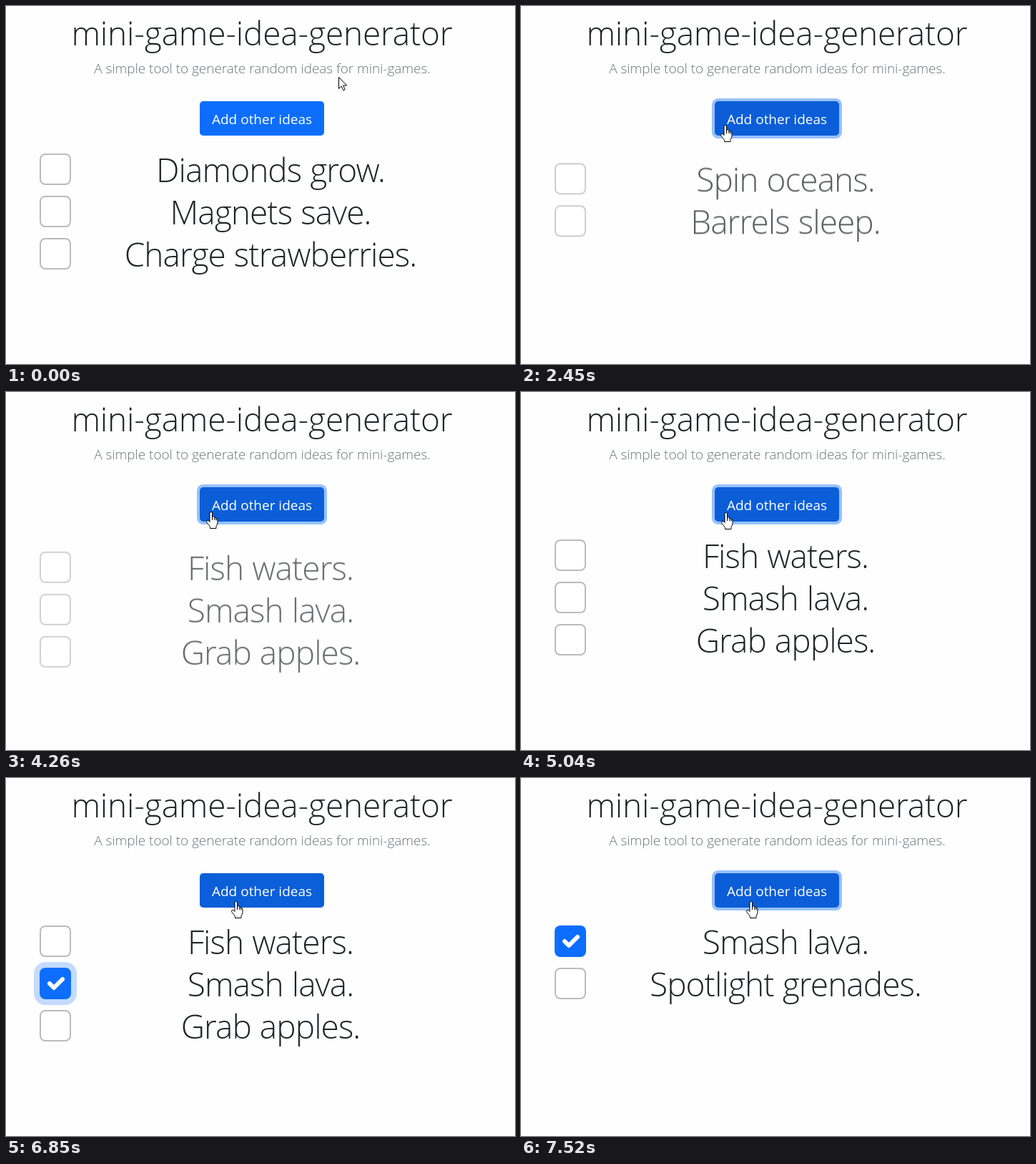
Recreate the animation shown at these times as an HTML page. Size 712 by 500 pixels, loop 8 s.

```html
<!DOCTYPE html>
<html lang="en">
<head>
<meta charset="utf-8">
<title>mini-game-idea-generator</title>
<style>
  html, body { margin: 0; width: 100%; height: 100%; overflow: hidden; background: #fefefe; }
  svg { display: block; width: 712px; height: 500px; }
  text { font-family: "Open Sans", "Noto Sans", sans-serif; font-weight: 300; text-anchor: middle; fill: #212529; }
  .big { font-size: 46px; letter-spacing: -.95px; word-spacing: 1px; }
  .title { letter-spacing: -.2px; }
  .lead { font-size: 19px; letter-spacing: -.05px; fill: #6c757d; }
  .label { font-size: 19px; font-weight: 400; fill: #fff; }

  /* Everything runs on one 8 s clock: 1% = 80 ms */
  .btn  { animation: btn 8s linear infinite; }
  .ring { animation: ring 8s linear infinite; }
  .halo { animation: halo 8s linear infinite; }
  .tick { animation: tick 8s step-end infinite; }
  .set-a { animation: set-a 8s step-end infinite; }
  .set-b { animation: set-b 8s linear infinite; }
  .set-c { animation: set-c 8s linear infinite; }
  .kept  { animation: kept 8s step-end infinite; }
  .fresh { animation: fresh 8s linear infinite; }
  .cursor { animation: move 8s linear infinite; }
  .arrow { animation: arrow 8s step-end infinite; }
  .hand  { animation: hand 8s step-end infinite; }

  @keyframes btn {
    0%, 15.7% { fill: #0d6efd; }
    17.5%, 74% { fill: #0b5ed7; }
    75.9%, 83.75% { fill: #0d6efd; }
    85.7%, 100% { fill: #0b5ed7; }
  }
  @keyframes ring {
    0%, 27.75% { opacity: 0; }
    29.6%, 74% { opacity: 1; }
    75.9%, 87.2% { opacity: 0; }
    89.1%, 100% { opacity: 1; }
  }
  @keyframes halo {
    0%, 74% { opacity: 0; }
    75.9%, 87.2% { opacity: 1; }
    89.1%, 100% { opacity: 0; }
  }
  @keyframes tick { 0% { opacity: 0; } 74%, 100% { opacity: 1; } }

  @keyframes set-a { 0% { opacity: 1; } 27.875%, 100% { opacity: 0; } }
  @keyframes set-b {
    0%, 27.875% { opacity: 0; transform: translateY(51px); animation-timing-function: ease; }
    34.125% { opacity: 1; transform: none; }
    50.81% { opacity: 1; transform: none; animation-timing-function: step-start; }
    50.82%, 100% { opacity: 0; transform: none; }
  }
  @keyframes set-c {
    0%, 50.8125% { opacity: 0; transform: translateY(51px); animation-timing-function: ease; }
    57.0625% { opacity: 1; transform: none; }
    87.62% { opacity: 1; transform: none; animation-timing-function: step-start; }
    87.63%, 100% { opacity: 0; transform: none; }
  }
  @keyframes kept { 0% { opacity: 0; } 87.625%, 100% { opacity: 1; } }
  @keyframes fresh {
    0%, 87.625% { opacity: 0; transform: translateY(51px); animation-timing-function: ease; }
    93.875%, 100% { opacity: 1; transform: none; }
  }

  @keyframes move {
    0% { transform: translate(465px, 99px); }
    12.3% { transform: translate(465px, 99px); animation-timing-function: ease-in-out; }
    19% { transform: translate(280px, 167px); }
    23.1% { transform: translate(280px, 167px); }
    24% { transform: translate(286px, 166px); }
    46.87% { transform: translate(286px, 166px); animation-timing-function: step-start; }
    46.875% { transform: translate(287px, 167px); }
    62.99% { transform: translate(287px, 167px); animation-timing-function: step-start; }
    63% { transform: translate(287px, 168px); }
    64.2% { transform: translate(287px, 168px); animation-timing-function: ease-in-out; }
    67.375% { transform: translate(44px, 335px); }
    69.3% { transform: translate(44px, 335px); animation-timing-function: ease-in-out; }
    72.125% { transform: translate(52px, 308px); }
    76.4% { transform: translate(52px, 308px); animation-timing-function: ease-in-out; }
    85.6%, 100% { transform: translate(322px, 172px); }
  }
  @keyframes arrow { 0% { opacity: 1; } 15.7% { opacity: 0; } 64.9% { opacity: 1; } 83.75%, 100% { opacity: 0; } }
  @keyframes hand  { 0% { opacity: 0; } 15.7% { opacity: 1; } 64.9% { opacity: 0; } 83.75%, 100% { opacity: 1; } }
</style>
</head>
<body>
<svg viewBox="0 0 712 500">
  <defs>
    <rect id="box" x="48" y="207" width="42" height="42" rx="7" fill="#fff" stroke="#bbb" stroke-width="2"/>
    <g id="checked">
      <rect x="47" y="206" width="44" height="44" rx="8" fill="#0d6efd"/>
      <path d="M61 228l6 6l12-12" fill="none" stroke="#fff" stroke-width="6" stroke-linecap="round" stroke-linejoin="round"/>
    </g>
  </defs>

  <text class="big title" x="358" y="55">mini-game-idea-generator</text>
  <text class="lead" x="358.5" y="94">A simple tool to generate random ideas for mini-games.</text>

  <rect class="ring" x="269" y="131" width="178" height="52" rx="6.8" fill="none" stroke="#98c1fe" stroke-width="4"/>
  <rect class="btn" x="271" y="133" width="174" height="48" rx="4.8"/>
  <text class="label" x="358" y="165">Add other ideas</text>

  <g class="set-a">
    <use href="#box"/>
    <use href="#box" y="59"/>
    <use href="#box" y="118"/>
    <text class="big" x="370" y="246">Diamonds grow.</text>
    <text class="big" x="370" y="305">Magnets save.</text>
    <text class="big" x="370" y="364">Charge strawberries.</text>
  </g>

  <g class="set-b">
    <use href="#box"/>
    <use href="#box" y="59"/>
    <text class="big" x="370" y="246">Spin oceans.</text>
    <text class="big" x="370" y="305">Barrels sleep.</text>
  </g>

  <g class="set-c">
    <use href="#box"/>
    <use href="#box" y="59"/>
    <use href="#box" y="118"/>
    <rect class="halo" x="43" y="261" width="52" height="52" rx="12" fill="none" stroke="#c3dbff" stroke-width="8"/>
    <g class="tick"><use href="#checked" y="59"/></g>
    <text class="big" x="370" y="246">Fish waters.</text>
    <text class="big" x="370" y="305">Smash lava.</text>
    <text class="big" x="370" y="364">Grab apples.</text>
  </g>

  <g class="kept">
    <use href="#checked"/>
    <text class="big" x="370" y="246">Smash lava.</text>
  </g>
  <g class="fresh">
    <use href="#box" y="59"/>
    <text class="big" x="370" y="305">Spotlight grenades.</text>
  </g>

  <g class="cursor" fill="#fff" stroke="#000" stroke-linejoin="round">
    <path class="arrow" d="M.5 .5V16.5L4.2 13L6.8 18.8L9.2 17.7L6.7 12H11.7Z"/>
    <g class="hand">
      <path d="M-2 2Q-2 .5 -.3 .5Q1.5 .5 1.5 2V8Q2 6.6 3.3 6.8Q4.8 7 4.8 8.6Q6.8 7.4 7 9.8Q9 9.2 9 11.5V15.5Q9 18 7 20.5V23.5H-1.5V21.5Q-3 18.5 -6 15.5Q-7.2 12.5 -5 12.2Q-3.6 12.2 -2 14.5Z"/>
      <path d="M1.5 8V12M4.8 8.6V12M7 9.8V12.5" fill="none"/>
    </g>
  </g>
</svg>
</body>
</html>
```
